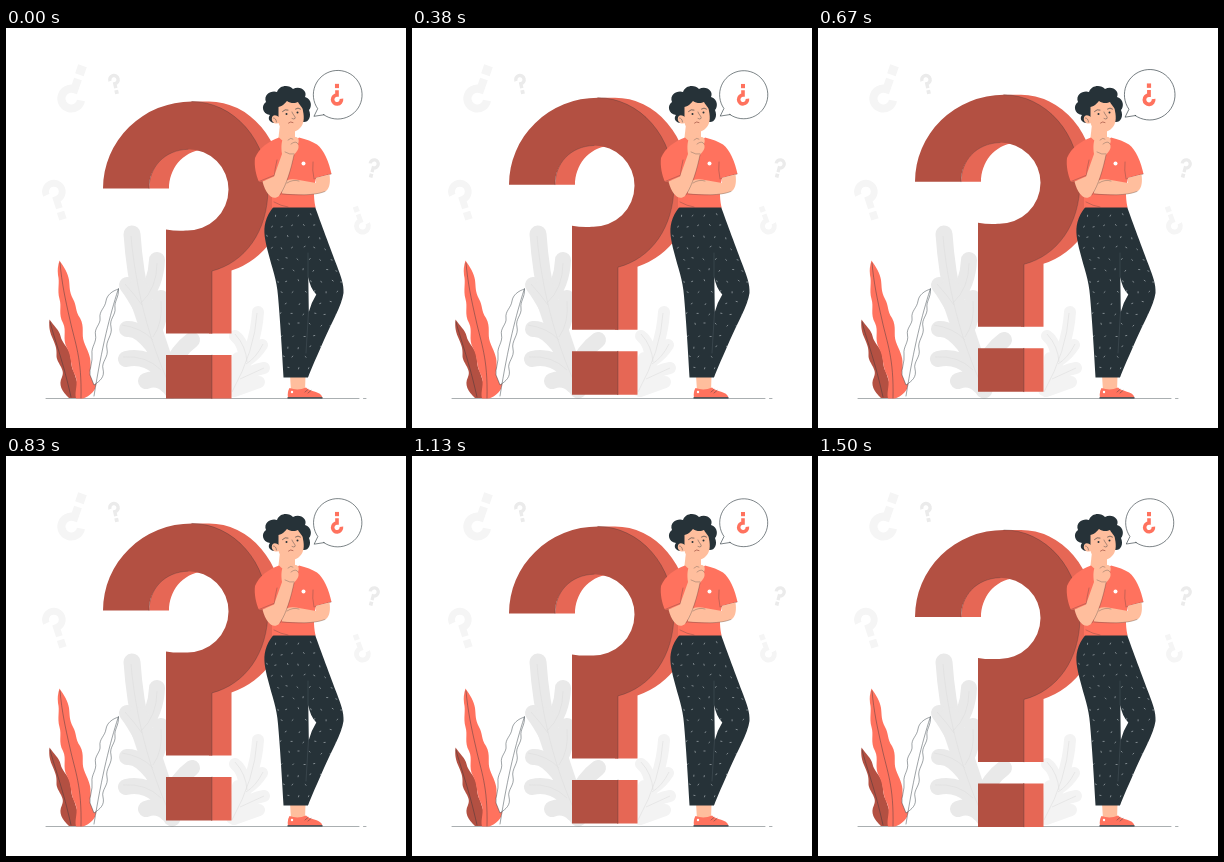
Animation of 400 by 400 pixels, one loop 1.54 s. Source, as an HTML page:

```html
<!DOCTYPE html>
<html lang="en">
<head>
<meta charset="utf-8">
<title>Thinking</title>
<style>
  html, body { margin: 0; width: 100%; height: 100%; overflow: hidden; background: #fff; }
  svg { display: block; width: 100vw; height: 100vh; }
  .coral { fill: #ff725e; }
  .brick { fill: #b35042; }
  .side { fill: #e66755; }
  .ink { fill: #263238; }
  .skin { fill: #ffbe9d; }
  .line { fill: none; stroke: #263238; stroke-width: .6; stroke-linecap: round; stroke-linejoin: round; }
  .thin { stroke-width: .4; }
  .pale { fill: none; stroke-linecap: round; }
  .vein { fill: none; stroke: #dedede; stroke-width: .6; }
</style>
</head>
<body>
<svg viewBox="0 0 400 400">
  <defs>
    <g id="mark">
      <path d="M-4.4 -4.6A4.4 4.4 0 1 1 0 -.8V4" fill="none" stroke="currentColor" stroke-width="3.6"/>
      <rect x="-2" y="6" width="4" height="4.2" fill="currentColor"/>
    </g>
    <path id="trousers" d="M268 178.500H309C314 193 325 222 331 238C335 249 338 256 337.500 265C336 277 325 296 318 312C311 328 306 339 302 349.500H277.500C276 322 274 290 272 268C271 252 266 240 262 224C259 212 257 203 259.500 194Q262 185 268 178.500Z"/>
    <clipPath id="cut"><use href="#trousers"/></clipPath>
  </defs>

  <g id="marks"></g>

  <!-- pale foliage -->
  <g class="pale" stroke="#e9e9e9" stroke-width="16">
    <path stroke-width="17" d="M126 206C129 250 140 310 166 362"/>
    <path d="M151 232Q150 256 136 272M121 257Q128 266 137 283M155 270Q156 288 147 304M121 301Q133 300 146 317M120 331Q138 327 153 340M140 353Q152 348 162 358M186 312Q172 322 162 344"/>
    <path stroke-width="22" d="M132 262L154 328"/>
  </g>
  <g class="pale" stroke="#f3f3f3" stroke-width="12">
    <path d="M252 284Q250 320 226 362M229 308Q238 315 239 332M256 317Q250 327 240 333M258 340Q246 342 236 350M232 330L230 362M253 354L228 363"/>
  </g>
  <path class="vein" d="M125 208C129 255 142 313 166 362M151 235Q151 260 135 275M119 256Q129 267 136 277M155 273Q157 295 147 309M116 297Q136 300 147 312M117 329Q140 327 155 342M251 285Q249 322 226 364M229 306Q240 318 241 334M257 316Q250 330 240 336M258 340L234 351"/>

  <path class="line" stroke-opacity=".65" d="M40 370.500H353M357.500 370.500H360"/>

  <!-- plants -->
  <path class="brick" d="M43.500 291.500C48 298 53 302 54.500 308C56 315 61 318 63.500 324C66 331 64 337 68 344L76 370H63C56 363 52 357 56 349C60 341 50 335 50.500 327C51 320 49 316 46 309C43 302 43 297 43.500 291.500Z"/>
  <path class="coral" d="M53.500 232.500C58 239 62 245 63 252C64 260 63 263 67 271C71 278 69 283 74 290C79 299 75 306 78 314C81 322 85 328 84.500 336C84 343 91 347 90.500 355C90 363 84 368 77 370.500H70C68 363 73 356 69 347C64 338 66 329 61 320C56 311 61 303 57 295C52 286 56 279 53.500 271C51 262 54 255 52 247Q51 240 53.500 232.500Z"/>
  <path class="line thin" d="M54 235C56 256 59 270 64 292C69 315 76 330 75 370M44 294C50 316 57 333 65 369"/>
  <path class="line" style="fill:#fff;stroke-width:.45" d="M112.500 261C106 263 101 267 100 273C99 280 93 283 94 290C95 296 88 300 89.500 307C91 314 85 319 86 326C87 334 83 341 84 347L88 357C94 353 99 349 97 341C95 334 103 329 101 321C99 313 107 307 105 299C103 291 110 287 109 280C108 273 113 270 112.500 261ZM112 262C104 287 96 318 88 368"/>

  <!-- big question mark -->
  <g id="big">
    <path class="side" d="M185 74H203A74 87 0 0 1 277 161H282A79 86 0 0 1 225.500 243V306H203V240L245 200V110Z"/>
    <path class="side" d="M143 161Q143 128 180 118L197 122.300C176 124 163 142 163 161Z"/>
    <path class="brick" d="M97 161A89 87 0 0 1 186 74A76 87 0 0 1 262 161C262 204 239 235 206 243.500V306H160V202Q170 203.700 180 203A41 41 0 0 0 222.500 162A40.500 40 0 0 0 182 121.800C158 122.500 143 140 143 161Z"/>
    <path class="side" d="M205 327.500H225.500V371H205Z"/>
    <path class="brick" d="M160 327.500H206V371H160Z"/>
    <path class="line thin" stroke-opacity=".65" d="M143 161C143 140 158 122.500 182 121.800M186 74A76 87 0 0 1 262 161C262 204 239 235 206 243.500V306M206 327.500V371"/>
  </g>

  <!-- speech bubble -->
  <g id="bubble">
    <path class="line" style="fill:#fff" d="M318 86.500L308.300 88L312 80.500A24 24 0 1 1 318 86.500Z"/>
    <use href="#mark" color="#ff725e" transform="translate(331 66.200) rotate(180)"/>
  </g>

  <!-- woman -->
  <path class="skin" d="M284 347H299.500L299 363H285Z"/>
  <path class="coral" d="M283.500 360Q292 363 300 359.500C304 364 315 363 316.500 369.500H282Q281 364 283.500 360Z"/>
  <path class="ink" d="M281.500 369.300H316.500V370.600H281.500Z"/>
  <circle cx="286" cy="364" r="1.200" fill="#fff"/>
  <path class="line thin" d="M299 364L302 361.500M302 365L305 362.500"/>
  <use href="#trousers" class="ink"/>
  <path id="specks" clip-path="url(#cut)" fill="none" stroke="#b4bcc0" stroke-width=".65" stroke-linecap="round"/>
  <path fill="#fff" d="M302.300 249Q304 260 310.300 266.500Q305 275 302.800 284Z"/>
  <path class="line thin" style="stroke:#536067" d="M302 225V249M302.500 284L300 325"/>

  <path class="skin" d="M274 96H289V115L284 124L272 114Z"/>
  <path class="coral" d="M273 109.500C263 113 253 120 249 130C248 138 250 147 253 154L266 151V179.500H309.500C307 167 308 160 310 150L325.500 146C323 134 318 122 311 116.500Q304 112 293 109.500Q284 121 273 109.500Z"/>
  <path class="line thin" stroke-opacity=".65" d="M266 166C268 156 268 143 271 132M308 151Q306 142 307 134M253 153.500L269 147M309 150.500L325 146M268 174Q275 178 282 179"/>
  <path class="skin" d="M310 150L323.500 146.500C324.500 153 324 160 320 163C311 168 291 167 276 165.500L276 155Q282 150 290 151.500L310 155Z"/>
  <path class="skin" d="M256.500 153.500L268 148.500L276 126C275 119 275 112 279 108C282 105 285 106 287 109C292 108 294 112 292 116C294 121 290 124 288 127C285 141 280 158 273 168C267 173 260 167 256.500 153.500Z"/>
  <path class="line thin" stroke-opacity=".7" d="M276 166C290 167 308 168 319 163.500M288 127C285 141 281 156 274 167M281 155Q287 151 293 153M282 112Q285 109 287 111M285 116Q290 112 292 116M279 124Q284 127 288 126"/>
  <circle cx="297.500" cy="135.500" r="2" fill="#fff"/>

  <path class="ink" d="M268 95C262 94 262 89 264 87C256 86 255 77 260 74C257 66 266 62 271 64C273 57 283 56 287 61C294 57 302 63 299 69C306 71 306 79 303 82C306 89 302 95 297 94L284 84Z"/>
  <path class="skin" d="M272.500 79C277 78 279 75 281 73C285 76 290 75 292 74C293 77 297 79 297 83C298.500 90 298 96 294 100C290 105 281 105 277 101C274 99 273 97 272.500 95C268 97 265 93 266 89.500C267 86 271 87 272.500 89Z"/>
  <g class="line">
    <path d="M276.500 83.500Q279 80.700 282 82M289.500 81Q292 79 294.500 81"/>
    <path class="thin" d="M286 84C287 87 290 89 289 90.500Q287.500 91.500 286 90.500M267.500 90Q270 90 270.500 94"/>
    <path d="M282.500 95Q284.500 93 287 94.500" stroke="#8e3b30"/>
  </g>
  <circle class="ink" cx="280.500" cy="86" r="1"/>
  <circle class="ink" cx="291.500" cy="84.500" r="1"/>
</svg>
<script>
  const $ = id => document.getElementById(id);
  const LOOP = 1540;

  // background marks: x, y, scale, angle, colour
  $('marks').innerHTML = [
    [69, 59.5, 2.25, 199, '#f5f5f5'], [109, 56.5, .95, -12, '#ebebeb'], [51, 173, 1.9, -18, '#f5f5f5'],
    [367, 140.5, .92, 15, '#ebebeb'], [354, 191.5, 1.35, 160, '#f5f5f5']
  ].map(([x, y, s, a, c]) =>
    `<use href="#mark" color="${c}" transform="translate(${x} ${y}) rotate(${a}) scale(${s})"/>`).join('');

  // trouser specks on a jittered grid
  let seed = 7;
  const rnd = () => (seed = seed * 16807 % 2147483647) / 2147483647;
  let d = '';
  for (let row = 0; row < 15; row++) {
    for (let col = 0; col < 8; col++) {
      const x = 258 + col * 11 + (row % 2) * 5.5 + rnd() * 3;
      const y = 185 + row * 11 + rnd() * 3;
      const a = rnd() * Math.PI;
      d += `M${x.toFixed(1)} ${y.toFixed(1)}l${(Math.cos(a) * 1.2).toFixed(1)} ${(Math.sin(a) * 1.2).toFixed(1)}`;
    }
  }
  $('specks').setAttribute('d', d);

  // steady rise and fall
  const lift = t => {
    const p = (t + 50) % LOOP / LOOP;
    return -7.7 * (1 - Math.abs(2 * p - 1));
  };

  // two heartbeats, then rest
  const beat = [[0, 1.015], [170, 1.065], [420, 1], [560, 1], [700, 1.06], [870, 1], [1490, 1], [LOOP, 1.015]];
  const pulse = t => {
    const i = beat.findIndex(([end]) => t < end);
    const [t0, s0] = beat[i - 1], [t1, s1] = beat[i];
    return s0 + (s1 - s0) * (1 - Math.cos(Math.PI * (t - t0) / (t1 - t0))) / 2;
  };

  const start = performance.now();
  function draw() {
    const t = (performance.now() - start) % LOOP;
    $('big').setAttribute('transform', `translate(0 ${lift(t)})`);
    $('bubble').setAttribute('transform',
      `translate(331.5 66.5) scale(${pulse(t)}) translate(-331.5 -66.5)`);
    requestAnimationFrame(draw);
  }
  draw();
</script>
</body>
</html>
```
